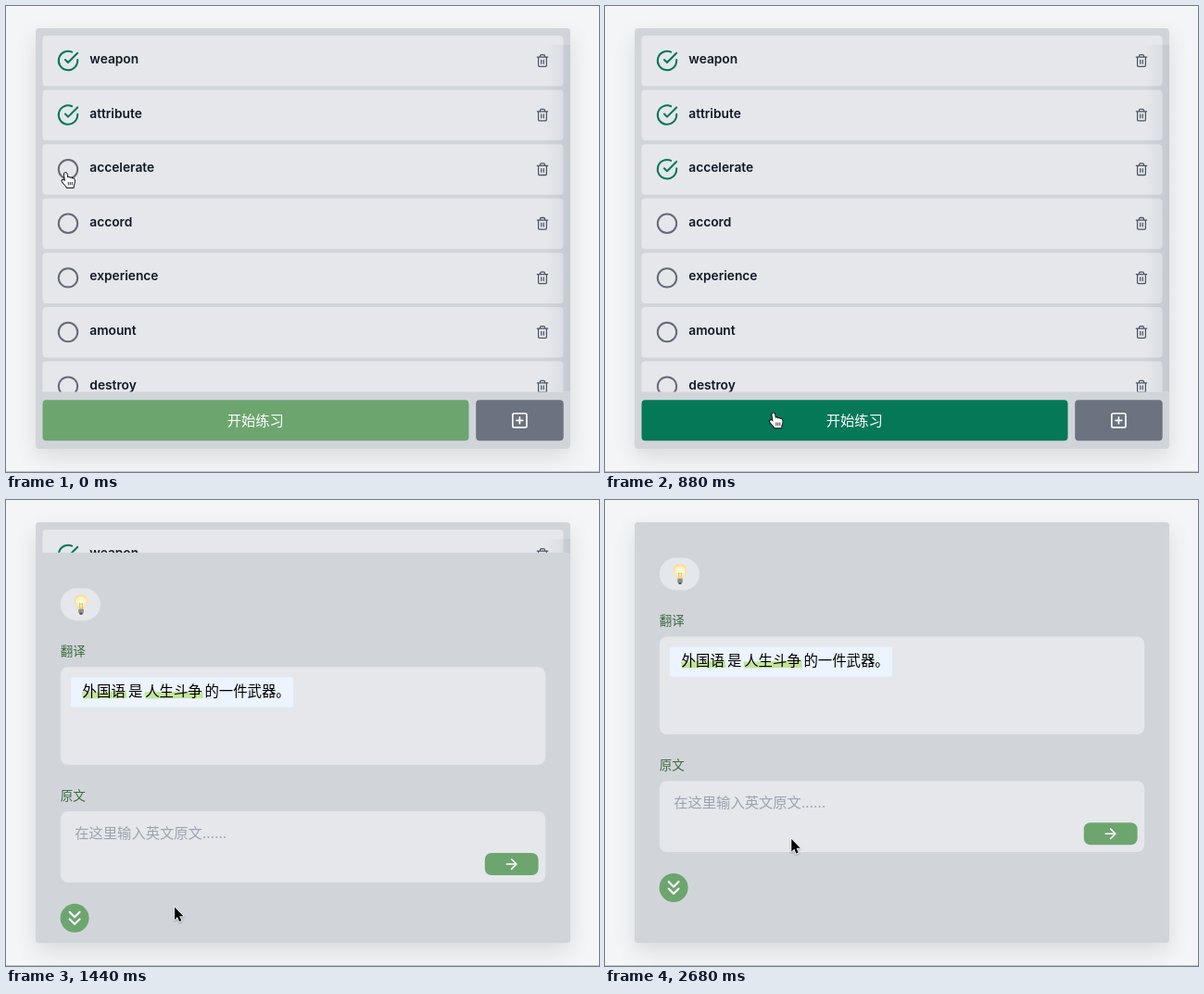
These frames come from a looping animation (640x503 px, 2700 ms). An HTML page with a canvas:

```html
<!DOCTYPE html>
<html lang="zh-CN">
<head>
<meta charset="utf-8">
<title>Word list</title>
<style>
html, body { margin: 0; width: 100%; height: 100%; overflow: hidden; background: #f4f5f7; }
canvas { display: block; width: 640px; height: 503px; }
</style>
</head>
<body>
<canvas id="stage" width="640" height="503"></canvas>
<script>
const ctx = document.getElementById('stage').getContext('2d');
const LOOP = 2700;
const CARD = { x: 32, y: 24, w: 577, h: 454 };
const CJK = 'Inter, "Noto Sans CJK SC", "Noto Sans CJK", sans-serif';
const WORDS = ['weapon', 'attribute', 'accelerate', 'accord', 'experience', 'amount', 'destroy'];
const GREY = '#d1d5da', LIGHT = '#e5e7eb', GREEN = '#6da56f', DEEP = '#047857';

// Line icons on a 24 unit grid
const ICON = {
  ring: new Path2D('M22 12a10 10 0 1 1-20 0a10 10 0 1 1 20 0Z'),
  check: new Path2D('M22 11.08V12a10 10 0 1 1-5.93-9.14M22 4L12 14.01L9 11.01'),
  trash: new Path2D('M3 6H21M19 6v14a2 2 0 0 1-2 2H7a2 2 0 0 1-2-2V6m3 0V4a2 2 0 0 1 2-2h4a2 2 0 0 1 2 2v2M10 11v6M14 11v6'),
  plus: new Path2D('M5 3H19a2 2 0 0 1 2 2V19a2 2 0 0 1-2 2H5a2 2 0 0 1-2-2V5a2 2 0 0 1 2-2ZM12 8v8M8 12h8'),
  arrow: new Path2D('M5 12H19M12 5l7 7l-7 7'),
  down: new Path2D('M7 13l5 5l5-5M7 6l5 5l5-5')
};

const HAND = new Path2D('M-1.6 1.4C-1.6-.4 1.1-.4 1.2 1.4L1.9 5.3C2.6 4.4 4.2 4.7 4.5 5.9C5.2 5 6.8 5.4 7 6.6C7.9 6 9.3 6.6 9.4 8C9.7 10.5 9 12 8.4 13.5L8.3 15.8H1.2C.3 13.6-1.8 12.3-3.8 9.4C-4.6 8-2.8 7.1-1.6 8.2L-.6 9.2Z');
const FINGERS = new Path2D('M2.8 10v3.4M4.8 10v3.4M6.8 10v3.4');
const POINTER = new Path2D('M0 0V13.4L3 10.6L5.1 15.6L7.3 14.6L5.2 9.8H9.4Z');
const BEAM = new Path2D('M-2.5-6.5Q0-6.5 0-4.8Q0-6.5 2.5-6.5M0-5V5M-2.5 6.5Q0 6.5 0 4.8Q0 6.5 2.5 6.5M-1.4 1.5H1.4');

const clamp = v => Math.min(1, Math.max(0, v));
const span = (t, a, b) => clamp((t - a) / (b - a));
const mix = (a, b, p) => a + (b - a) * p;
const easeInOut = (s, n) => s < .5 ? .5 * (2 * s) ** n : 1 - .5 * (2 - 2 * s) ** n;

// Cubic bezier easing with control points (x1, 0) and (x2, 1)
function bezier(x, x1, x2) {
  let lo = 0, hi = 1;
  for (let i = 0; i < 24; i++) {
    const s = (lo + hi) / 2, r = 1 - s;
    if (3 * r * r * s * x1 + 3 * r * s * s * x2 + s ** 3 < x) lo = s; else hi = s;
  }
  return 3 * lo * lo - 2 * lo ** 3;
}

function box(x, y, w, h, r, fill) {
  ctx.beginPath();
  ctx.roundRect(x, y, w, h, r);
  ctx.fillStyle = fill;
  ctx.fill();
}

function text(str, x, y, font, color, align = 'left') {
  ctx.font = font;
  ctx.fillStyle = color;
  ctx.textAlign = align;
  ctx.fillText(str, x, y);
}

function icon(path, x, y, scale, color, width = 2, alpha = 1) {
  ctx.save();
  ctx.translate(x, y);
  ctx.scale(scale, scale);
  ctx.translate(-12, -12);
  ctx.globalAlpha = alpha;
  ctx.strokeStyle = color;
  ctx.lineWidth = width;
  ctx.lineCap = ctx.lineJoin = 'round';
  ctx.stroke(path);
  ctx.restore();
}

function drawCard() {
  ctx.fillStyle = '#f4f5f7';
  ctx.fillRect(0, 0, 640, 503);
  ctx.save();
  ctx.shadowColor = 'rgba(0,0,0,.11)';
  ctx.shadowBlur = 24;
  ctx.shadowOffsetY = 9;
  box(CARD.x, CARD.y, CARD.w, CARD.h, 4, GREY);
  ctx.restore();
  ctx.fillStyle = '#c3c4c6';
  ctx.fillRect(0, 502, 640, 1);
}

function drawList(t) {
  const checked = span(t, 10, 80);
  ctx.save();
  ctx.beginPath();
  ctx.rect(32, 24, 577, 392.5);
  ctx.clip();
  WORDS.forEach((word, i) => {
    const y = 32 + i * 58.6;
    const on = i < 2 ? 1 : i === 2 ? checked : 0;
    box(39.5, y, 562, 54.5, 4, LIGHT);
    if (on < 1) icon(ICON.ring, 67, y + 27, 1.02, '#666b78', 2, 1 - on);
    if (on > 0) icon(ICON.check, 67, y + 27, 1.02, DEEP, 2, on);
    text(word, 90.3, y + 30, '600 13.75px Inter, sans-serif', '#111827');
    icon(ICON.trash, 579, y + 27, .63, '#4b5563');
  });
  ctx.restore();

  const shade = ctx.createLinearGradient(582, 0, 609, 0);
  shade.addColorStop(0, 'rgba(80,85,110,0)');
  shade.addColorStop(1, 'rgba(80,85,110,.09)');
  ctx.fillStyle = shade;
  ctx.fillRect(582, 42, 27, 374);
}

function drawButtons(t) {
  const hover = bezier(span(t, 735, 880), .4, .2);
  const rgb = [[109, 4], [165, 120], [111, 87]].map(([a, b]) => Math.round(mix(a, b, hover)));
  box(39.5, 425.3, 460, 44, 4, `rgb(${rgb})`);
  text('开始练习', 269.3, 453.2, '500 15.3px ' + CJK, '#fff', 'center');
  box(507.2, 425.3, 94.5, 44, 4, '#6b7280');
  icon(ICON.plus, 554.4, 447.3, .84, '#fff');
}

function drawBulb() {
  const glow = ctx.createRadialGradient(81, 77, 1, 81, 77, 8);
  glow.addColorStop(0, '#fffdf0');
  glow.addColorStop(.55, '#fff0b8');
  glow.addColorStop(1, '#f3d580');
  ctx.fillStyle = glow;
  ctx.fill(new Path2D('M81 69.3C85.5 69.3 88 72.4 88 76C88 80 84.3 81.3 83.8 85.5H78.2C77.7 81.3 74 80 74 76C74 72.4 76.5 69.3 81 69.3Z'));
  ctx.strokeStyle = '#d9a94d';
  ctx.lineWidth = .7;
  ctx.stroke(new Path2D('M80 85L79.3 78.5L81 80L82.7 78.5L82 85'));
  box(78.2, 85, 5.6, 4.6, 1, '#8d8f94');
  box(79.3, 89, 3.4, 2, 1, '#4e5055');
}

function marker(x1, x2) {
  ctx.fillStyle = '#c5e499';
  ctx.beginPath();
  ctx.moveTo(x1, 174.5);
  ctx.lineTo(x2 - 1, 173.6);
  ctx.lineTo(x2, 181);
  ctx.lineTo(x1 + 1, 181.6);
  ctx.fill();
}

function drawPanel(offset) {
  const label = '13.5px ' + CJK, line = '15.4px ' + CJK;
  ctx.save();
  ctx.translate(0, offset);
  box(CARD.x, CARD.y, CARD.w, CARD.h, 4, GREY);
  box(58.8, 62.5, 43.2, 34.8, 17.4, LIGHT);
  drawBulb();

  text('翻译', 58.7, 135, label, '#3d6b40');
  box(58.8, 147.4, 523.4, 105.6, 8, LIGHT);
  box(70, 158.4, 240, 32.4, 3, '#ebf4ff');
  marker(82, 130.5);
  marker(149.5, 213);
  [['外国语', 82.6], ['是', 132], ['人生斗争', 150.2], ['的一件武器。', 214.4]]
    .forEach(([str, x]) => text(str, x, 179.3, line, '#000'));

  text('原文', 58.7, 291, label, '#3d6b40');
  box(58.8, 303.2, 523.4, 76.8, 8, LIGHT);
  text('在这里输入英文原文……', 74.2, 332.2, '15.3px ' + CJK, '#9ca3af');
  box(516.8, 348.2, 57.8, 24, 7, GREEN);
  icon(ICON.arrow, 545.6, 360.2, .76, '#fff');

  box(58.6, 403, 31, 31, 15.5, GREEN);
  icon(ICON.down, 74.1, 418.5, 1.08, '#fff');
  ctx.restore();
}

function cursorAt(t) {
  if (t < 1700) {
    const s = span(t, 380, 860);
    return [mix(64.5, 182, easeInOut(s, 4.2)), mix(180, 439.5, easeInOut(s, 3.4))];
  }
  const s = span(t, 1960, 2460);
  return [mix(182, 201.3, easeInOut(s, 2.2)), mix(438.5, 366, easeInOut(s, 3.4))];
}

function outline(path, fill, stroke, width) {
  ctx.strokeStyle = stroke;
  ctx.lineWidth = width;
  ctx.stroke(path);
  if (fill) {
    ctx.fillStyle = fill;
    ctx.fill(path);
  }
}

function drawCursor(t) {
  ctx.save();
  ctx.translate(...cursorAt(t));
  ctx.lineJoin = 'round';
  if (t < 1350) {
    outline(HAND, '#fff', '#000', 1.8);
    outline(FINGERS, null, '#000', .8);
  } else if (t < 1430) {
    outline(BEAM, null, 'rgba(255,255,255,.8)', 2.4);
    outline(BEAM, null, '#000', 1.1);
  } else {
    ctx.shadowColor = 'rgba(0,0,0,.3)';
    ctx.shadowBlur = 2;
    ctx.shadowOffsetY = 1;
    outline(POINTER, null, '#fff', 1.8);
    ctx.shadowColor = 'transparent';
    outline(POINTER, '#000', '#000', .1);
  }
  ctx.restore();
}

function draw(t) {
  const offset = CARD.h * (1 - bezier(span(t, 1294, 1502), .4, .28));
  drawCard();
  ctx.save();
  ctx.beginPath();
  ctx.roundRect(CARD.x, CARD.y, CARD.w, CARD.h, 4);
  ctx.clip();
  if (offset > .05) {
    drawList(t);
    drawButtons(t);
  }
  if (t > 1300) drawPanel(offset);
  ctx.restore();
  drawCursor(t);
}

const start = performance.now();
function tick() {
  draw((performance.now() - start) % LOOP);
  requestAnimationFrame(tick);
}
tick();
</script>
</body>
</html>
```
